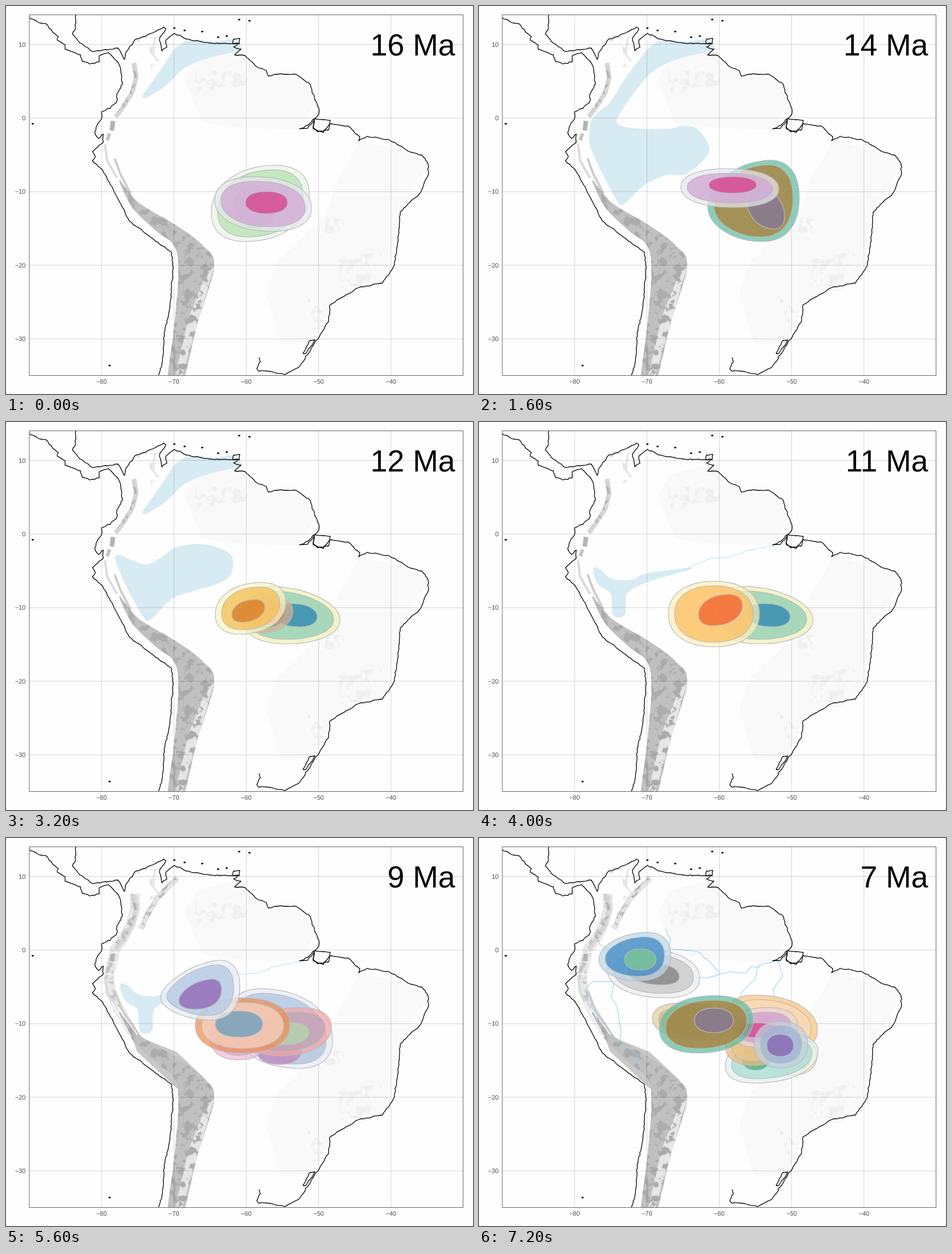
Write an HTML page that moves like this. It is 821 by 682 pixels and loops after 8000 ms.

```html
<!DOCTYPE html>
<html lang="en">
<head>
<meta charset="utf-8">
<title>Contours through time</title>
<style>
html, body { margin: 0; width: 100%; height: 100%; overflow: hidden; background: #fefefe; }
svg { display: block; width: 821px; height: 682px; }
text { font-family: "Liberation Sans", Arial, sans-serif; }
#labels { font-size: 11px; fill: #4d4d4d; }
#age { font-size: 53.5px; text-anchor: end; }
#coast path { fill: none; stroke: #000; stroke-width: 1.3; stroke-linejoin: round; }
.water { fill: #d7ebf3; }
.river { fill: none; stroke: #93d2ed; stroke-width: 1.1; }
.ring { stroke: #b9b9bf; stroke-width: 1.2; }
.strip { fill: none; stroke-linejoin: round; }
</style>
</head>
<body>
<svg viewBox="0 0 821 682">
  <defs>
    <filter id="blotch" filterUnits="userSpaceOnUse" x="0" y="0" width="821" height="682">
      <feTurbulence type="fractalNoise" baseFrequency=".07" numOctaves="5" seed="4"/>
      <feColorMatrix values="0 0 0 0 0 0 0 0 0 0 0 0 0 0 0 12 0 0 0 -6.2" result="mask"/>
      <feComposite in="SourceGraphic" in2="mask" operator="in"/>
    </filter>
    <clipPath id="panel"><rect x="41" y="16" width="762" height="633"/></clipPath>
  </defs>
  <g clip-path="url(#panel)">
    <g id="land"></g>
    <g id="water"></g>
    <g id="grid" stroke="#000" stroke-opacity=".17"></g>
    <g id="coast"></g>
    <g id="taxa"></g>
  </g>
  <rect x="41" y="15.5" width="762.5" height="634" fill="none" stroke="#666"/>
  <g id="labels"></g>
  <text id="age" x="789.5" y="87"></text>
</svg>
<script>
const $ = id => document.getElementById(id);
const parse = s => s.split(' ').map(p => p.split(',').map(Number));
const line = s => 'M' + s.replaceAll(' ', 'L');
const shape = (s, fill, extra = '') => `<path d="${line(s)}Z" fill="${fill}" ${extra}/>`;
const strip = (s, width, color, extra = '') =>
  `<path class="strip" d="${line(s)}" stroke="${color}" stroke-width="${width}" ${extra}/>`;
const blotch = 'filter="url(#blotch)"';

// Closed curve through all points
function smooth(s) {
  const p = parse(s), n = p.length;
  return 'M' + p[0] + p.map((b, i) => {
    const a = p[(i + n - 1) % n], c = p[(i + 1) % n], e = p[(i + 2) % n];
    return `C${b.map((v, k) => v + (c[k] - a[k]) / 6)} ${c.map((v, k) => v - (e[k] - b[k]) / 6)} ${c}`;
  }).join('') + 'Z';
}

let seed = 7;
const random = () => (seed = seed * 16807 % 2147483647) / 2147483647 - .5;

// Polyline with small seeded kinks
function rough(s, attrs = '') {
  const p = parse(s);
  const d = p.slice(1).map((b, i) => {
    const a = p[i], steps = Math.ceil(Math.hypot(b[0] - a[0], b[1] - a[1]) / 5);
    return Array.from({ length: steps }, (_, k) =>
      'L' + a.map((v, j) => v + (b[j] - v) * (k + 1) / steps + (k < steps - 1 ? random() * 2 : 0))).join('');
  }).join('');
  return `<path d="M${p[0]}${d}" ${attrs}/>`;
}

const coasts = [
  '41,20 60,30 70,31 82,46 92,54 90,60 104,68 104,76 131,86 134,97 147,102 164,98 164,87 180,82 194,96 201,108 205,137 195,155 195,167 183,180 168,186 168,198 161,208 156,222 163,233 171,225 171,239 152,256 157,265 152,272 170,289 192,330 217,378 255,407 291,433 294,460 288,530 278,575 275,625 268,650',
  '123,15 122,38 117,50 127,62 152,80 178,77 197,74 208,94 210,83 226,60 246,53 277,37 281,40 270,56 274,79 283,72 281,60 296,48 316,58 345,63 375,66 410,66 400,72 413,76 402,86 420,87 441,107 458,114 461,123 478,120 510,120 535,138 538,152 550,180 550,190 530,210 516,216',
  '516,216 530,215 542,200 540,216 558,222 570,207 602,211 622,230 620,237 635,229 675,236 712,257 731,262 741,275 743,295 727,330 693,362 690,402 683,455 662,487 620,495 570,525 567,555 540,597 515,635 490,648 463,642 445,642 441,637 447,626 445,618',
  '542,198 570,201 567,218 548,221 540,212 542,198',
  '400,58 411,57 410,66 399,66 400,58',
  '522,611 534,588 543,587 527,611 522,611'
];
const islands = '47,207 182,632 296,39 314,43 345,45 373,55 388,53 410,24 428,26';
$('coast').innerHTML = coasts.map(s => rough(s)).join('') +
  parse(islands).map(([x, y]) => `<ellipse cx="${x}" cy="${y}" rx="2" ry="1.4"/>`).join('');

const shields = ['335,92 400,76 462,122 520,122 545,165 515,218 400,213 345,205 313,130',
  '622,237 712,258 741,280 692,362 665,485 570,525 540,590 484,595 457,505 475,450 562,370 580,310'];
const patches = ['332,115 390,112 428,125 420,140 335,158', '565,370 588,375 582,412 558,405',
  '585,445 665,430 632,495 582,490', '525,508 565,545 548,572'];
const andes = smooth('199,306 222,354 262,394 296,422 303,470 296,560 284,670 308,670 336,560 366,458 345,420 300,386 250,357 225,338');
const range = '226,98 227,125 218,155 205,178 192,195 187,215 181,240 184,270 200,305 225,345';
const spur = '302,70 268,103 250,132 237,160';
const faults = ['181,203 199,201', '172,240 193,240', '180,217 197,219', '186,288 220,350', '196,297 231,346'];
$('land').innerHTML =
  shields.map(s => shape(s, '#f9f9f9')).join('') +
  patches.map(s => shape(s, '#f0f0f0', blotch)).join('') +
  `<g id="young">${strip(range, 18, '#e9e9e9') + strip(range, 12, '#c2c2c2', blotch) +
    strip(spur, 10, '#e4e4e4') + strip(spur, 9, '#b8b8b8', blotch) +
    shape('205,300 240,352 300,376 352,425 366,458 300,440 230,375', '#c9c9c9')}</g>` +
  strip('225,100 229,125 222,152 207,176 193,195', 8, '#d6d6d6') +
  strip('225,106 228,130 218,158 194,193', 5, '#b4b4b4', blotch) +
  strip('188,202 186,219', 8, '#b4b4b4') + strip('182,224 178,236', 6, '#c4c4c4') +
  strip('174,243 178,272 195,302', 4, '#dadada') + strip('191,268 201,295 219,330', 4, '#cdcdcd') +
  strip('230,60 240,56 254,62 258,84 266,92 249,120', 8, '#e4e4e4', blotch) +
  strip('262,54 258,85 268,97', 4, '#e9e9e9') +
  `<path d="${andes}" fill="#c0c0c0"/>` +
  shape('352,470 366,458 336,560 310,650 298,650 320,550', '#e6e6e6') +
  `<path d="${andes}" fill="#acacac" ${blotch}/>` +
  `<g id="faults">${faults.map(s => strip(s, 1.6, '#fff')).join('')}</g>`;

const tick = v => String(v).replace('-', '−');
for (let i = 0; i < 5; i++) {
  const x = 168 + i * 127.2, y = 67.5 + i * 129.4;
  $('grid').innerHTML += `<path d="M${x} 16V649M41 ${y}H803"/>`;
  $('labels').innerHTML += `<text x="${x}" y="664" text-anchor="middle">${tick(i * 10 - 80)}</text>` +
    `<text x="34.5" y="${y + 4}" text-anchor="end">${tick(10 - i * 10)}</text>`;
}

const pool = s => `<path class="water" d="${smooth(s)}"/>`;
const river = s => rough(s, 'class="river"');
const shore = '324,60 360,63 397,59 413,71 408,79 350,93 310,112 285,137';
const gulf = pool(shore + ' 255,157 242,162 241,156 252,140 275,108 298,74');
const wide = pool(shore + ' 250,185 243,205 265,214 330,216 365,210 390,222 404,257 365,295 330,297 290,315 255,348 240,338 205,270 194,240 196,206 208,188 230,170 255,130 280,97 300,72');
const split = gulf + pool('194,234 242,250 270,240 300,220 350,215 395,233 395,268 370,285 330,297 290,312 255,347 240,340 205,275');
const lake = pool('201,256 215,260 225,270 240,277 270,277 295,266 375,257 300,280 265,297 258,312 258,335 250,343 236,340 233,318 230,300 212,288 204,275') +
  `<g opacity=".6">${river('360,260 410,239 441,238 470,226 525,216')}</g>`;
const rivers = ['530,215 497,222 490,228 478,226 468,238 440,235 400,246 355,242 265,243 237,253 200,252 188,265 192,290 216,324',
  '327,160 337,178 333,193 385,200 405,217 422,237', '210,178 212,187 240,207 265,235',
  '237,253 232,280 243,297 250,340 248,357 278,380 277,398', '492,222 485,248 465,268 440,310',
  '525,215 534,242 517,265 525,310'].map(river).join('');

// Rounded oval fitted to a box; lean tips its right side down, taper fattens it
function ring([left, right, top, bottom, lean = 0, taper = 0], color, opacity) {
  const round = v => Math.sign(v) * Math.abs(v) ** .9;
  const points = Array.from({ length: 72 }, (_, i) => {
    const x = Math.cos(i * Math.PI / 36), y = Math.sin(i * Math.PI / 36);
    return [round(x), round(y) * (1 + taper * x) + lean * x];
  });
  const ys = points.map(p => p[1]), low = Math.min(...ys), high = Math.max(...ys);
  const fitted = points.map(([x, y]) =>
    [left + (x + 1) / 2 * (right - left), top + (y - low) / (high - low) * (bottom - top)].map(v => v.toFixed(1)));
  return `<path class="ring" d="M${fitted.join('L')}Z" fill="#${color}" fill-opacity="${opacity}"/>`;
}

// Two nested ovals around a separately placed core
function taxon(colors, box, core) {
  const [outer, middle, center] = colors.split(' ');
  const [left, right, top, bottom, ...form] = box;
  return ring(box, outer, .72) + ring([left + 11, right - 11, top + 8, bottom - 8, ...form], middle, .75) +
    (core ? ring(core, center, .88) : '');
}

const pink = 'e8e8ee d2a6d6 d84f94', teal = '5fbda0 ad7d38 877a90', orange = 'fdf0bc fcbf62 f46f38';
const green = taxon('ebf6e7 b5e3ae 98beb0', [361, 533, 280, 414, -.25], [400, 476, 316, 390]);
const pinkEast = taxon(pink, [367, 537, 300, 396, .15], [421, 495, 326, 365]);
const pinkNorth = taxon(pink, [355, 527, 286, 354, .05], [404, 488, 300, 329]);
const tealEast = taxon(teal, [402, 563, 271, 414, -.1, .25], [471, 537, 319, 392, .4]);
const sea = taxon('f0f0b8 8fcfb4 3d91b2', [410, 587, 289, 390, .15, -.2], [470, 547, 319, 360, .15]);
const moss = taxon('deb08c 80a478 e08050', [412, 504, 307, 371, -.2], [430, 490, 320, 358, -.2]);
const amber = taxon('f8f6c4 f4bf55 dd842f', [368, 492, 282, 373, -.25], [397, 455, 312, 352, -.35]);
const gold = taxon(orange, [333, 493, 280, 395], [386, 463, 303, 358, -.3]);

const scenes = [
  [gulf, green + pinkEast],
  [wide, green + pinkNorth],
  [wide, tealEast + pinkNorth],
  [split, tealEast + amber],
  [split, sea + moss + amber],
  [lake, sea + gold],
  [lake,
    taxon('f59a78 f8c070 ec6040', [425, 552, 290, 424, .2]) +
    taxon('f7a888 fcd08c ec6040', [420, 577, 271, 413, .3], [438, 504, 314, 368, -.2]) +
    taxon('f0dcb4 e4b984 a5b0b0', [450, 540, 303, 392], [480, 526, 322, 383]) + gold +
    taxon('e8e8e8 c8c8c8 7c7c7c', [295, 476, 232, 333, .1, -.1], [359, 447, 263, 304, -.1])],
  [lake,
    taxon('f2d0a0 f0c890', [450, 563, 330, 398]) +
    taxon('e8eef5 aec6e3 c090c4', [390, 574, 265, 405, .3], [440, 520, 345, 398]) +
    taxon('eebcdc dca8d0', [358, 460, 310, 390]) +
    taxon('f5a8a4 bca4b8 b5d2ae', [425, 572, 298, 383, -.2], [455, 533, 324, 364, -.1]) +
    taxon('f28c54 f4d3c3 7ba3bc', [333, 499, 281, 378], [368, 451, 304, 350]) +
    taxon('e6edf3 b2c9e4 9674bb', [272, 411, 215, 320, -.2, .4], [304, 379, 248, 301, -.4, .2])],
  [rivers,
    taxon('f1a284 fbdcd2 b0a5a2', [275, 402, 221, 300, .1], [310, 372, 246, 283]) +
    taxon(teal, [262, 351, 209, 282, .1], [283, 321, 228, 267]) +
    taxon('fbeadb f8b880 f3752f', [380, 530, 254, 370, .2], [435, 500, 288, 326, .2]) +
    taxon('ef6e70 6c6090 6aa06a', [462, 592, 345, 428], [490, 552, 372, 406]) +
    taxon('fae0cc f4a060 ee6f28', [420, 598, 297, 397, .4], [460, 565, 318, 372, .4]) +
    taxon('fdd49c fdc070 b0b49c', [425, 558, 304, 367, .1], [436, 527, 320, 356]) +
    taxon(orange, [306, 445, 278, 390], [347, 415, 315, 367]) +
    taxon('e6dcd8 cd96cb d94a8f', [330, 456, 275, 392, .3], [371, 421, 298, 340])],
  [rivers,
    taxon('eeeeee c8c8c8 8c8c8c', [225, 388, 195, 281, .2], [260, 352, 217, 258, .3]) +
    taxon('c0d8e8 3f88c4 78c298', [211, 337, 166, 251, -.1, .2], [256, 311, 195, 232]) +
    taxon('fbc57c f8dab8', [435, 595, 276, 372, .3]) +
    taxon('fbeeb8 fbbe68', [505, 594, 350, 417]) +
    taxon('e2f2ee aadfd4 5cb486', [433, 596, 345, 431, -.3], [462, 511, 368, 408]) +
    taxon('f0bc78 ecc48c', [433, 530, 330, 400]) +
    taxon('ead7d8 cf9cd0 dc4f97', [440, 560, 298, 368, -.1], [456, 525, 325, 351]) +
    taxon('c4d0e0 9eb5d4 8b6db4', [484, 578, 322, 404], [506, 553, 345, 384]) +
    taxon('e2cf9a dcbc70', [305, 440, 290, 356, .2]) +
    taxon(teal, [317, 482, 277, 378, -.15], [379, 447, 299, 342])]
];

const stepMs = 800;
let shown = -1;
function draw(now) {
  const index = Math.floor(now / stepMs) % scenes.length;
  if (index !== shown) {
    shown = index;
    [$('water').innerHTML, $('taxa').innerHTML] = scenes[index];
    $('age').textContent = `${16 - index} Ma`;
    for (const id of ['young', 'faults']) $(id).style.display = index < 7 ? 'none' : '';
  }
  requestAnimationFrame(() => draw(performance.now() - start));
}
const start = performance.now();
draw(0);
</script>
</body>
</html>
```
